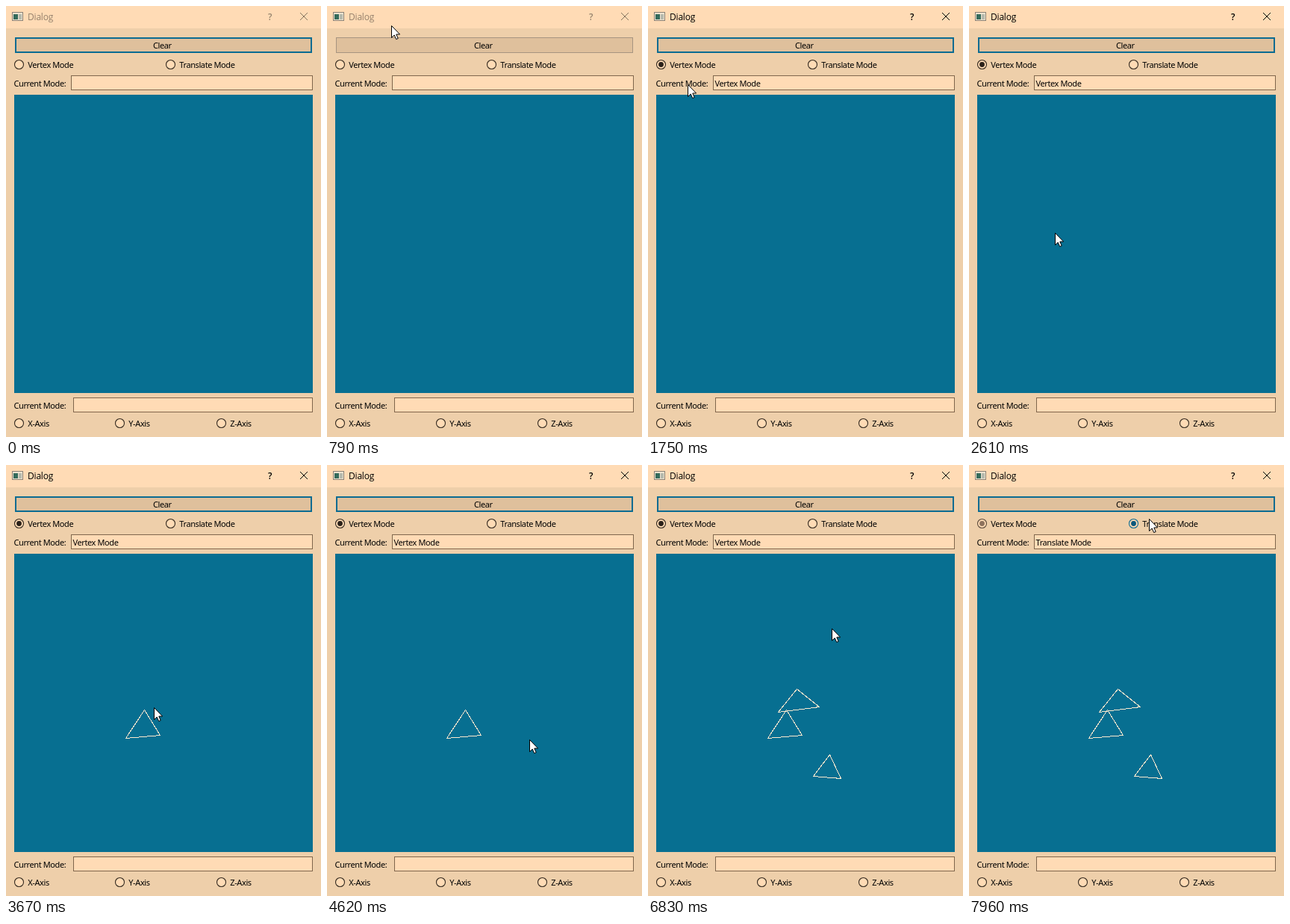
An HTML page that plays this animation: 422x578 px, repeating every 8000 ms.

```html
<!DOCTYPE html>
<html lang="en">
<head>
<meta charset="utf-8">
<title>Dialog</title>
<style>
  :root { --pale: #ffdbb5; --blue: #0a6b92; --ink: #000; }
  html, body { margin: 0; width: 100%; height: 100%; overflow: hidden; background: #eecfaa; }
  svg { display: block; width: 422px; height: 578px; }
  text { font: 11px "Noto Sans", "Open Sans", sans-serif; letter-spacing: -.4px; fill: var(--ink); white-space: pre; }
  .bar text { font: 12px "Open Sans", "Noto Sans", sans-serif; letter-spacing: -.2px; fill: #96826d; }
  .bar path { stroke: #85725e; fill: none; }
  .active .bar text { fill: var(--ink); }
  .active .bar path { stroke: var(--ink); }
  .field { fill: var(--pale); stroke: #7f664c; }
  .button { fill: #dfc09c; stroke: #a69480; }
  .halo { fill: none; stroke: var(--blue); stroke-width: 2; visibility: hidden; }
  .lit .halo { visibility: visible; }
  .ring { fill: var(--pale); stroke: #33291f; stroke-width: 1.1; }
  .hover .ring { stroke: var(--blue); }
  .dot { fill: #2a211a; visibility: hidden; }
  .on .dot { visibility: visible; }
  .hover .dot { fill: #0a587c; }
  .fading .dot { fill: #8d725d; }
  .fading .ring { stroke: #5c4b3c; }
  .tri { fill: none; stroke: #ffeacf; shape-rendering: crispEdges; visibility: hidden; }
  .tri.shown { visibility: visible; }
</style>
</head>
<body>
<svg id="stage" viewBox="0 0 422 578">
  <rect width="422" height="578" fill="#eecfaa"/>
  <g class="bar">
    <rect width="422" height="30" fill="#ffdbb5"/>
    <rect x="8.5" y="8.5" width="14" height="11" fill="#eee3d0" stroke="#8b8276"/>
    <rect x="10" y="11" width="6" height="7" fill="#356b5c"/>
    <rect x="17" y="11" width="4" height="7" fill="#b5b9ad"/>
    <text x="29" y="19">Dialog</text>
    <text x="351" y="18.5" style="font-weight:600">?</text>
    <path d="M394 9L404 19M404 9L394 19"/>
  </g>

  <g id="clear">
    <rect class="button" x="12.5" y="42.5" width="397" height="20"/>
    <rect class="halo" x="13" y="43" width="396" height="19"/>
    <text x="197" y="57">Clear</text>
  </g>

  <g id="radios"></g>

  <text x="10.5" y="108">Current Mode:</text>
  <rect class="field" x="87.5" y="93.5" width="323" height="19"/>
  <text id="mode" x="89.5" y="108"></text>

  <rect x="11" y="119" width="400" height="400" fill="#076f91"/>
  <path class="tri" d="M160.5 366.5L185.5 328.5L206.5 362.5Z"/>
  <path class="tri" d="M221.5 417.5L243.5 388.5L258.5 420.5Z"/>
  <path class="tri" d="M174.5 331.5L199.5 300.5L229.5 324.5Z"/>

  <text x="10.5" y="540">Current Mode:</text>
  <rect class="field" x="90.5" y="525.5" width="320" height="19"/>

  <path id="cursor" d="M.5 .5V16.5L4.2 13 6.7 18.6 9.2 17.5 6.8 12H11.6Z" fill="#fff" stroke="#000"/>
</svg>
<script>
const LOOP = 8000, START = 25, TICK = 95.6;
const $ = id => document.getElementById(id);

const labels = [
  ['Vertex Mode', 17.5, 78.5], ['Translate Mode', 220.5, 78.5],
  ['X-Axis', 17.5, 559.5], ['Y-Axis', 152.5, 559.5], ['Z-Axis', 288.5, 559.5]
];
$('radios').innerHTML = labels.map(([name, x, y]) => `<g>
  <circle class="ring" cx="${x}" cy="${y}" r="6"/>
  <circle class="dot" cx="${x}" cy="${y}" r="3.4"/>
  <text x="${x + 11.8}" y="${y + 4.5}">${name}</text></g>`).join('');
const [vertex, translate] = $('radios').children;
const triangles = document.querySelectorAll('.tri');
const drawnAt = [34, 50, 66];

// Pointer stops: tick, x, y
const path = [
  [7, 96, 7], [8, 86, 26], [9, 86, 26], [10, 80, 44], [12, 55, 72], [14, 45, 78], [17, 45, 78],
  [20, 68, 160], [24, 112, 314], [26, 112, 314], [27, 115, 304], [28, 138, 264], [29, 156, 246],
  [30, 156, 246], [33, 193, 306], [37, 193, 306], [42, 218, 402], [43, 218, 402],
  [46, 257, 351], [47, 261, 353], [48, 271, 368], [50, 283, 407], [53, 283, 407],
  [59, 137, 251], [60, 138, 249], [61, 156, 226], [62, 178, 199], [63, 184, 199], [66, 233, 240],
  [68, 233, 240], [70, 291, 270], [71, 246, 219], [74, 125, 100], [76, 88, 71], [77, 93, 86],
  [80, 268, 75], [81, 268, 75], [82, 241, 72]
];

function pointer(k) {
  const i = path.findIndex(p => p[0] >= k);
  if (i < 0) return path.at(-1).slice(1);
  if (i === 0) return path[0].slice(1);
  const [k0, x0, y0] = path[i - 1], [k1, x1, y1] = path[i];
  const f = (k - k0) / (k1 - k0);
  return [x0 + (x1 - x0) * f, y0 + (y1 - y0) * f].map(Math.round);
}

function draw(t) {
  const k = Math.floor((t - START) / TICK);
  const set = (el, name, on) => el.classList.toggle(name, on);
  const switched = k >= 83;

  set($('stage'), 'active', k >= 16);
  set($('clear'), 'lit', t < 100 || k === 10 || k >= 16);
  set(vertex, 'hover', k >= 13 && k < 18);
  set(vertex, 'on', k >= 16);
  set(vertex, 'fading', switched);
  set(translate, 'hover', k >= 80);
  set(translate, 'on', switched);
  $('mode').textContent = switched ? 'Translate Mode' : k >= 16 ? 'Vertex Mode' : '';
  triangles.forEach((tri, i) => set(tri, 'shown', k >= drawnAt[i]));

  $('cursor').setAttribute('visibility', k >= 7 ? 'visible' : 'hidden');
  $('cursor').setAttribute('transform', `translate(${pointer(k)})`);
}

const begin = performance.now();
function loop() {
  draw((performance.now() - begin) % LOOP);
  requestAnimationFrame(loop);
}
loop();
</script>
</body>
</html>
```
